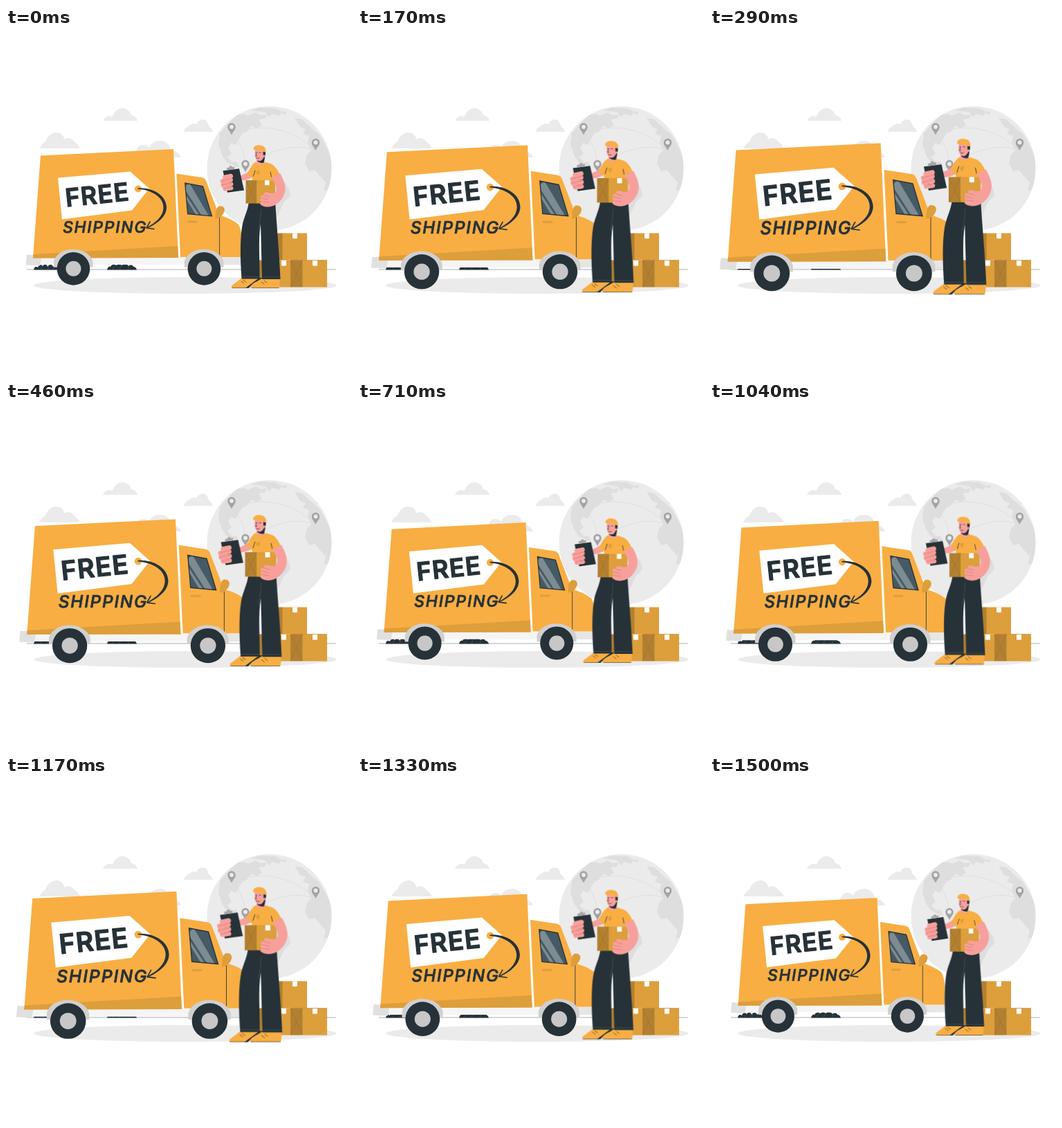
These frames come from a looping animation (500 px wide and 500 px high, 1.54 s). An HTML page:

```html
<!DOCTYPE html>
<html lang="en">
<head>
<meta charset="utf-8">
<title>Free shipping</title>
<style>
html, body { margin: 0; width: 100%; height: 100%; overflow: hidden; background: #fff; }
svg { display: block; width: 100vw; height: 100vh; }
.pulse { animation: pulse 1540ms linear infinite; }
#truck { transform-origin: 190px 273.5px; }
#man { transform-origin: 365px 272.5px; }
@keyframes pulse {
  0% { transform: scale(1); }
  11% { transform: scale(1.058); animation-timing-function: cubic-bezier(.33, .6, .67, 1); }
  20.5% { transform: scale(1.09); animation-timing-function: cubic-bezier(.33, 0, .67, .4); }
  29.9% { transform: scale(1.058); }
  46.1% { transform: scale(1.01); animation-timing-function: cubic-bezier(.33, .5, .67, 1); }
  55% { transform: scale(.994); animation-timing-function: cubic-bezier(.4, 0, .67, .5); }
  67.5% { transform: scale(1.032); animation-timing-function: cubic-bezier(.33, .5, .67, 1); }
  77% { transform: scale(1.085); animation-timing-function: cubic-bezier(.33, 0, .67, .5); }
  86.4% { transform: scale(1.045); }
  97.4% { transform: scale(.99); }
  100% { transform: scale(1); }
}
.dark { fill: #263238; }
.gold { fill: #f8ae43; }
.ochre { fill: #dd9e3c; }
.brown { fill: #b38030; }
.skin { fill: #f7a09b; }
.line { fill: none; stroke: #263238; stroke-linecap: round; stroke-linejoin: round; }
text { font-family: Inter, sans-serif; fill: #263238; stroke: #263238; stroke-linejoin: round; }
</style>
</head>
<body>
<svg viewBox="0 0 500 500">
<defs>
  <clipPath id="disc"><circle cx="380.5" cy="203" r="90"/></clipPath>
  <clipPath id="pane"><path d="M259.500 225 L284 229.500 L296.500 271 L263 268Z"/></clipPath>
  <g id="pin">
    <path d="M0 0C-2-5-5.700-7-5.700-11.500A5.700 5.700 0 0 1 5.700-11.500C5.700-7 2-5 0 0Z" fill="#a3a3a3"/>
    <circle cy="-11.500" r="2.900" fill="#ebebeb"/>
  </g>
  <g id="wheel">
    <path d="M-28.500-11C-25-22-13-28-1-28C12-28 24-22 28-11V-2H-28.500Z" fill="#d0d0d0"/>
    <circle r="23.800" class="dark"/>
    <circle r="11" fill="#c7c7c7"/>
  </g>
</defs>

<g fill="#ebebeb">
  <path d="M140 134C143 128 149 126 154 128C157 119 164 115 170 116C177 118 180 122 181 126C186 127 189 130 190 134Z"/>
  <path d="M256.500 150C259 144 264 141 267 140C270 137 273 138 275 139C278 132 286 130 290 135C293 139 292 141 294 143C297 145 298 147 299 150Z"/>
  <path d="M48 174C52 167 54 166 57 164C60 155 67 151 73 151C81 151 83 157 85 161C91 157 95 160 98 164C102 166 105 170 107 174Z"/>
  <path d="M186 187C187 174 193 168 199 169C203 169 205 171 207 173C209 166 216 163 223 163C232 163 237 169 238 177C245 178 251 181 253 187Z"/>
</g>

<circle cx="380.500" cy="203" r="90" fill="#ebebeb"/>
<g clip-path="url(#disc)">
  <g fill="#dedede">
    <path d="M309 152L320 139L333 126L344 124L350 127L361 122L368 126L377 125L374 131L365 132L370 140L362 145L355 141L349 149L341 153L336 162L332 169L325 166L321 173L326 181L320 187L327 194L333 193L337 202L329 199L319 194L312 184L307 168Z"/>
    <path d="M353 119L367 115L389 116L399 121L394 127L385 124L380 129L375 122L364 120Z"/>
    <path d="M417 130L428 132L440 143L453 154L463 172L472 190V232L459 235L462 223L452 212L446 205L438 207L432 196L435 183L441 177L436 166L438 156L429 153L433 146L425 143Z"/>
    <path d="M385 211L398 217L409 232L411 242L402 251L395 266L389 278L383 263L379 240Z"/>
    <path d="M401 120l5 2l-3 3l-5-2Z"/>
  </g>
  <g fill="none" stroke="#dcdcdc" stroke-width=".8">
    <path d="M326 154C359 137 412 141 447 177M346 208C362 183 411 163 447 177M326 154C340 164 347 185 346 208"/>
  </g>
</g>
<use href="#pin" x="326" y="154.500"/>
<use href="#pin" x="447.500" y="177"/>
<use href="#pin" x="346" y="208"/>

<ellipse cx="259" cy="372" rx="219" ry="12" fill="#ebebeb"/>
<path d="M30 349H477" stroke="#263238" stroke-width=".4"/>
<g class="dark">
  <path d="M40 349.500C41 345 43 344 46 346C47 342 51 341 53 344C55 341 59 341 60 345C62 341 67 341 68 345C71 342 75 344 76 349.500Z"/>
  <path d="M146 349.500C147 345 149 344 151 345C153 341 157 341 159 343C162 341 165 341 167 343C171 341 175 341 177 344C180 342 183 342 184 345C187 345 188 347 189 349.500Z"/>
</g>
<path d="M50 349l3-5M60 349l2-5M68 349l2-4M154 349l3-5M164 349l2-5M176 349l2-4" stroke="#55626a" stroke-width=".6"/>

<g id="truck" class="pulse">
  <path d="M48 331H340V342H48Z" fill="#f5f5f5"/>
  <path d="M30 327.500L52 329L49 343.500L28.500 342.500Z" fill="#e0e0e0"/>
  <path d="M309 331H341V342L310 342.500Z" fill="#e6e6e6"/>
  <path class="gold" d="M50 184.500L242 175L249 332L39 332.500Z"/>
  <path class="ochre" d="M39.400 327L248.200 315L249 332L39 332.500Z"/>
  <path class="gold" d="M246.500 210.500L283 216C286 216.500 288 218 289 221L304 260L308.500 270.500C320 274 329 278 336 284C339.500 290 340.500 299 341 306V331H252Z"/>
  <path class="dark" d="M258 223.300L285 228.300L298.300 272.500L262 269.300Z"/>
  <g clip-path="url(#pane)">
    <path d="M255 220H300V275H255Z" fill="#455a64"/>
    <path d="M257 231L265 224L294 273L284 273Z" fill="#7d8b92"/>
    <path d="M258 243L260 241L281 273H276Z" fill="#7d8b92"/>
  </g>
  <path d="M264 280H275" stroke="#dd9e3c" stroke-width="3" stroke-linecap="round"/>
  <path class="line" d="M308.500 272V331" stroke-width=".8"/>
  <path class="ochre" d="M302.500 274C302.500 265 304 259 308 257.500C313 256.500 316.500 260 315.500 264.500C314 270 309 275.500 302.500 275.500Z"/>
  <use href="#wheel" x="97.500" y="347.800"/>
  <use href="#wheel" x="286.300" y="347.800"/>

  <path d="M75 216.500L179.500 207.500L207 232L182 263.500L81 276.500Z" fill="#fff"/>
  <circle cx="191" cy="232.500" r="5" class="gold"/>
  <path class="dark" d="M190.500 231.300C211 230 231.500 241 232 259C232 273 218 283 204 289.500L203.300 288.300C217 281 227 272 227.500 260C228 244 210 234 190.500 232.800Z"/>
  <path class="line" d="M208 280L203 289L214 290.500" stroke-width="1.600"/>
  <text transform="translate(87 258.600) rotate(-6)" font-size="36" font-weight="600" letter-spacing="1.200" stroke-width="1.200">FREE</text>
  <text x="82" y="296" font-size="23" font-weight="500" font-style="italic" letter-spacing="1.700" stroke-width=".7">SHIPPING</text>
</g>

<g id="boxes">
  <path class="brown" d="M392 296.500H400V335.500H392Z"/>
  <path class="ochre" d="M399.500 296.500H435V335.500H399.500Z"/>
  <path class="brown" d="M362 335.500H378V374.500H362Z"/>
  <path class="ochre" d="M370 335.500H411.500V374.500H370Z"/>
  <path class="brown" d="M411 335.500H428.500V374.500H411Z"/>
  <path class="ochre" d="M428.500 335.500H464V374.500H428.500Z"/>
  <path d="M411.500 336L428 374M428 336L411.500 374M411 335.500H464M428.500 335.500V374" fill="none" stroke="#94692a" stroke-width=".4"/>
  <path d="M414 296.500h7v8l-2-1l-1.500 1.500l-1.500-1.500l-2 1ZM398 336h7v8l-2-1l-1.500 1.500l-1.500-1.500l-2 1ZM443 336h7v8l-2-1l-1.500 1.500l-1.500-1.500l-2 1Z" fill="#fff"/>
</g>

<g id="man" class="pulse">
  <path class="gold" d="M341 361L326.500 372C325.500 374 325.500 375.500 326.500 375.500H350L367 362Z"/>
  <path class="gold" d="M370 362L355 371C353 373 353 375.500 354 375.500H394.500C396 371 396 366 395 362Z"/>
  <path class="dark" d="M346 375.800L366 361H371L356 370L351 375.800Z"/>
  <path class="line" d="M327 375.500H349M355 375.500H394" stroke-width=".6"/>
  <path class="line" d="M340 366l4 3M343 364l4 3M369 367l4 3M373 365l4 3" stroke-width=".6"/>
  <path class="dark" d="M351 250H389C391 285 395 325 396.500 363H370L368 283C364 306 367 336 366.500 362.500H340.500C338.500 335 338 307 341 288C343 274 350 264 351 250Z"/>
  <path d="M368.500 262C368 273 367 283 364.500 291M370.500 360H396M341 359.500H366" fill="none" stroke="#56636a" stroke-width=".5"/>

  <path class="skin" d="M338 213.500C345 212 351 207 355 203L360 213C354 217 348 220 341 220.500Z"/>
  <path class="gold" d="M360 194C355 198 352 204 348.500 211L356 217.500V253H386V219L396 213C392 204 388 198 382 196L372 193Z"/>
  <path class="skin" d="M363 187L372 186L373.500 194.500C370 199 364 198 361.500 195Z"/>
  <path class="dark" d="M374 183C374.500 188 373 193 372 195C368 195.500 364 194 363 191.500Z"/>
  <path class="skin" d="M360 175L374 178C374 184 372 190 368 192C363 193 360 189 359.500 184Z"/>
  <path class="dark" d="M371.500 179L375 178.500C375.500 181 374.500 185 373.500 187L371.500 186Z"/>
  <circle cx="372.500" cy="185" r="1.700" class="skin"/>
  <path class="gold" d="M357.500 174.500C358 170 364 168.300 369 169.800C374 171 376 175 375.500 180L368 176.500L358 176Z"/>
  <path class="line" d="M361 180h2M366 180h2M362 181.500l-1 3.500h1.500M362 188q2 1 4 0" stroke-width=".7"/>
  <path class="line" d="M360 206l-2.500 8M382 208l1.500 7" stroke-width=".8"/>
  <path class="ochre" d="M362 206h5l-1 5l-2 1l-2-2Z"/>

  <path class="dark" d="M313.500 206.300L337 203.200L344 234.500L320 237.800Z"/>
  <path d="M319.500 205.500L319 202L322.500 201.500C322 198.500 326.500 198.500 327 201L330 200.500V204Z" fill="#a6a6a6"/>
  <g class="skin">
    <rect x="313" y="211.500" width="15" height="6.300" rx="3.100" transform="rotate(-12 321 214)"/>
    <rect x="309.500" y="217" width="18.500" height="6.300" rx="3.100" transform="rotate(-10 319 220)"/>
    <rect x="310.500" y="223" width="18" height="6.300" rx="3.100" transform="rotate(-8 320 226)"/>
    <rect x="313.500" y="229" width="15" height="6" rx="3" transform="rotate(-8 321 232)"/>
    <path d="M310 222L316 214L320 222L319 232L313 231Z"/>
  </g>
  <path d="M312 221L326 217.500M311 227L327 223.500M314 232L327 229.500" stroke="#d97a74" stroke-width=".7" fill="none"/>

  <path class="brown" d="M346.500 220H362.500V253.500H346.500Z"/>
  <path class="ochre" d="M362.500 220H389V253.500H362.500Z"/>
  <path d="M347 221L362 253M362 221L347 253" fill="none" stroke="#94692a" stroke-width=".4"/>
  <path d="M374 220h6.500v7.500l-2-1l-1.300 1.300l-1.300-1.300l-1.900 1Z" fill="#fff"/>
  <path class="skin" d="M384 216L396 210C400 217 404 226 403.500 233C403 242 398 250 390 255C384 259 375 260 369 256C366 254 367 251 371 251C367 250 367 247 369 246C366 243 369 240 373 242C371 238 375 236 379 238C384 239 387 240 390 236C392 231 388 223 384 216Z"/>
  <path d="M370 246L379 248M371 251L380 252M373 242L381 244" fill="none" stroke="#d97a74" stroke-width=".7"/>
</g>
</svg>
</body>
</html>
```
